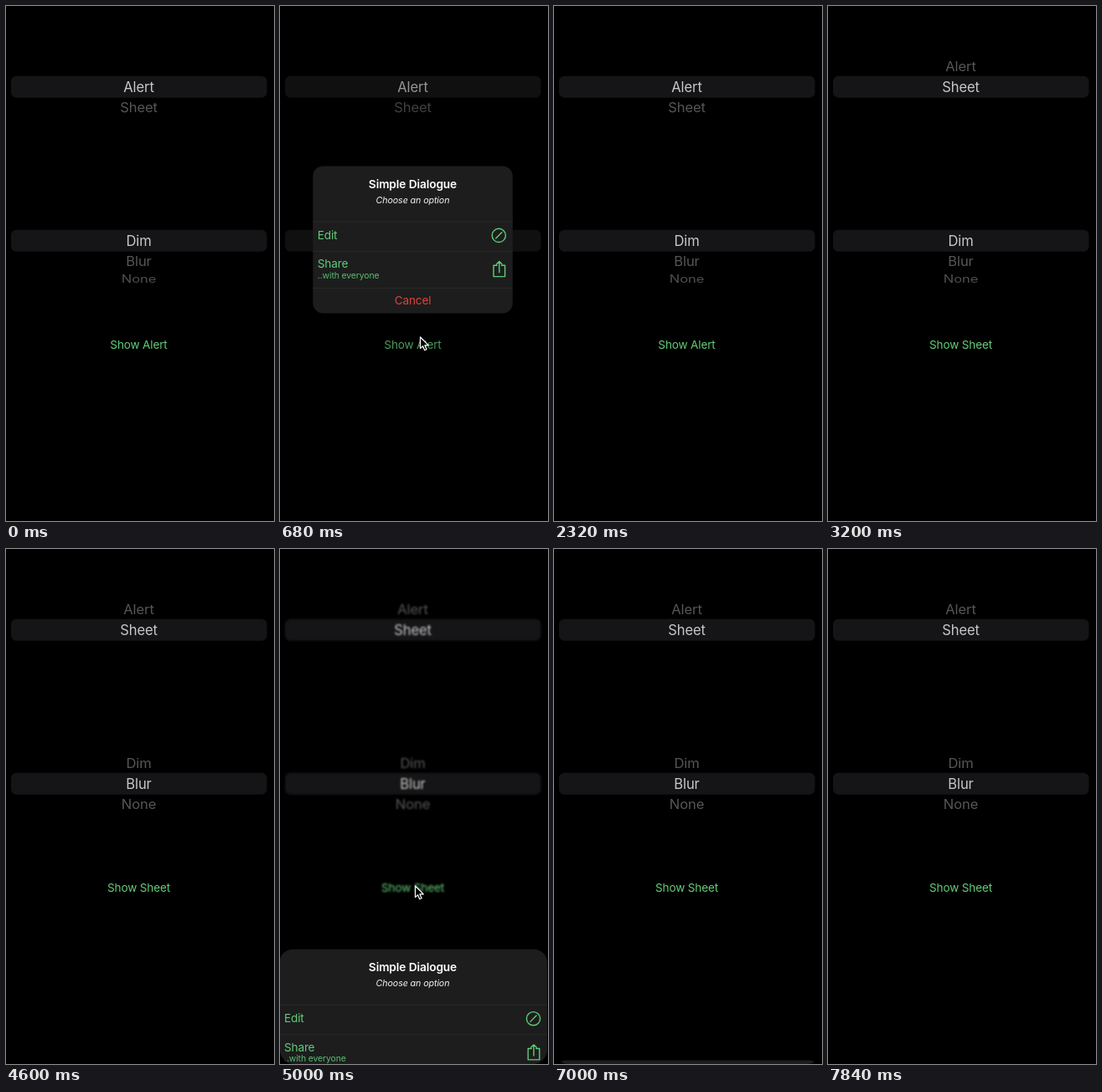
Write an HTML page that moves like this. It is 320 px wide and 616 px high and loops after 7920 ms.

```html
<!DOCTYPE html>
<html lang="en">
<head>
<meta charset="utf-8">
<title>Alert and sheet demo</title>
<style>
  html, body { margin: 0; width: 100%; height: 100%; overflow: hidden; background: #000; }
  svg { display: block; width: 100%; height: 100%; font-family: Inter, Roboto, sans-serif; }
  .mid { text-anchor: middle; }
  .row { font-size: 16.6px; letter-spacing: -.12px; }
  .label { font-size: 13.6px; letter-spacing: -.17px; }
  .title { font-size: 13.7px; letter-spacing: -.1px; font-weight: 600; fill: #fff; }
  .note { font-size: 10.7px; letter-spacing: -.1px; font-style: italic; fill: #f4f4f4; }
  .small { font-size: 10.4px; letter-spacing: -.1px; fill: #58bd6e; }
  .green { fill: #62cc78; }
  .red { fill: #d9463d; }
  .icon { fill: none; stroke: #62cc78; stroke-width: 1.4; stroke-linecap: round; stroke-linejoin: round; }
  .rule { stroke: #2a2a2b; stroke-width: .8; }
</style>
</head>
<body>
<svg viewBox="0 0 320 616" preserveAspectRatio="none">
  <defs>
    <filter id="soft" filterUnits="userSpaceOnUse" x="0" y="0" width="320" height="616"
            color-interpolation-filters="sRGB">
      <feGaussianBlur id="blur" stdDeviation="0"/>
    </filter>
    <clipPath id="screen"><rect y="400" width="319" height="216" rx="17"/></clipPath>
  </defs>
  <rect width="320" height="616" fill="#000"/>
  <g id="base">
    <g id="pickers"></g>
    <text id="button" class="mid label green" x="158.5" y="409.8"></text>
    <rect id="dim" width="320" height="616" fill="#000" opacity="0"/>
  </g>
  <g id="alert"></g>
  <g clip-path="url(#screen)"><g id="sheet"></g></g>
  <path id="cursor" d="M0 0V13.6L3.1 10.8L5.2 15.7L7.6 14.7L5.5 9.9H9.8Z"
        fill="#000" stroke="#fff" stroke-width="1.2" stroke-linejoin="round"/>
</svg>
<script>
const LOOP = 7920, MID = 158.5;
const STEP = 20.1 * Math.PI / 180, RADIUS = 71.2;
const $ = id => document.getElementById(id);

const clamp = v => Math.min(1, Math.max(0, v));
const span = (t, from, length) => clamp((t - from) / length);
const easeOut = p => 1 - (1 - p) ** 3;
const easeInOut = p => p * p * (3 - 2 * p);

function add(parent, tag, attrs, text) {
  const el = document.createElementNS('http://www.w3.org/2000/svg', tag);
  for (const key in attrs) el.setAttribute(key, attrs[key]);
  if (text) el.textContent = text;
  return parent.appendChild(el);
}

function makePicker(y, names) {
  const g = $('pickers');
  add(g, 'rect', { x: 6, y: y - 13.3, width: 305.5, height: 26, rx: 6.5, fill: '#151517' });
  const rows = names.map(name => add(g, 'text', { class: 'mid row' }, name));
  return selected => rows.forEach((row, i) => {
    const d = i - selected, a = d * STEP, near = Math.abs(d);
    const grey = Math.round(near < 1 ? 200 - 113 * near : 87 - 8 * (near - 1));
    row.setAttribute('fill', `rgb(${grey},${grey},${grey})`);
    row.setAttribute('transform',
      `translate(${MID} ${y + RADIUS * Math.sin(a)}) scale(1 ${Math.cos(a)}) translate(0 5.9)`);
  });
}

// Shared dialogue body; the origin is the top edge.
function makePanel(g, left, right, radius) {
  const text = (cls, x, y, s) => add(g, 'text', { class: cls, x, y }, s);
  const inner = left + 5.5, ix = right - 16.5;
  add(g, 'rect', { x: left, y: -.6, width: right - left, height: 176.1, rx: radius, fill: '#1d1d1e' });
  for (const y of [66, 101.5, 145.5]) add(g, 'line', { class: 'rule', x1: left, x2: right, y1: y, y2: y });
  text('mid title', MID, 26, 'Simple Dialogue');
  text('mid note', MID, 43.6, 'Choose an option');
  text('label green', inner, 87, 'Edit');
  text('label green', inner, 121.3, 'Share');
  text('small', inner, 134, '..with everyone');
  text('mid label red', MID, 165, 'Cancel');
  add(g, 'path', { class: 'icon', transform: `translate(${ix} 82.4)`,
    d: 'M8.1 0A8.1 8.1 0 1 1 -8.1 0A8.1 8.1 0 1 1 8.1 0M-3.6 3.7L3.6 -3.7' });
  add(g, 'path', { class: 'icon', transform: `translate(${ix + .5} 122.6)`,
    d: 'M-2.8 -4.4H-6.8V9H6.8V-4.4H2.8M0 4.2V-9M-3.2 -5.8L0 -9L3.2 -5.8' });
}

const setStyle = makePicker(97, ['Alert', 'Sheet']);
const setEffect = makePicker(281, ['Dim', 'Blur', 'None']);
makePanel($('alert'), 39.3, 277.8, 12);
makePanel($('sheet'), -.5, 319, 16);

// Pointer appearances: from, to, x, y
const taps = [
  [400, 960, 167.5, 396], [1680, 1880, 160, 350],
  [2760, 3000, 160, 117], [3680, 3920, 160, 302],
  [4680, 5440, 161.5, 403], [6480, 6680, 160, 597]
];

function draw(t) {
  setStyle(easeInOut(span(t, 2840, 340)));
  setEffect(easeInOut(span(t, 3760, 360)));
  $('button').textContent = t < 3120 ? 'Show Alert' : 'Show Sheet';

  const grow = easeOut(span(t, 500, 190));
  const shown = grow * (1 - easeInOut(span(t, 1780, 320)));
  const scale = 1.095 - .095 * grow;
  $('dim').setAttribute('opacity', .25 * shown);
  $('alert').setAttribute('opacity', shown);
  $('alert').setAttribute('transform',
    `translate(${MID} 279.8) scale(${scale}) translate(${-MID} -87.8)`);

  const up = easeOut(span(t, 4760, 600)) - easeOut(span(t, 6580, 600));
  $('sheet').setAttribute('transform', `translate(0 ${441.8 + 175 * (1 - up)})`);
  $('sheet').setAttribute('visibility', up > 0 ? 'visible' : 'hidden');
  const soft = span(t, 4760, 220) - span(t, 6580, 350);
  $('blur').setAttribute('stdDeviation', .85 * soft);
  if (soft > 0) $('base').setAttribute('filter', 'url(#soft)');
  else $('base').removeAttribute('filter');

  const tap = taps.find(([from, to]) => t >= from && t < to);
  $('cursor').setAttribute('visibility', tap ? 'visible' : 'hidden');
  if (tap) $('cursor').setAttribute('transform', `translate(${tap[2]} ${tap[3]})`);
}

function tick() {
  draw(performance.now() % LOOP);
  requestAnimationFrame(tick);
}
tick();
</script>
</body>
</html>
```
